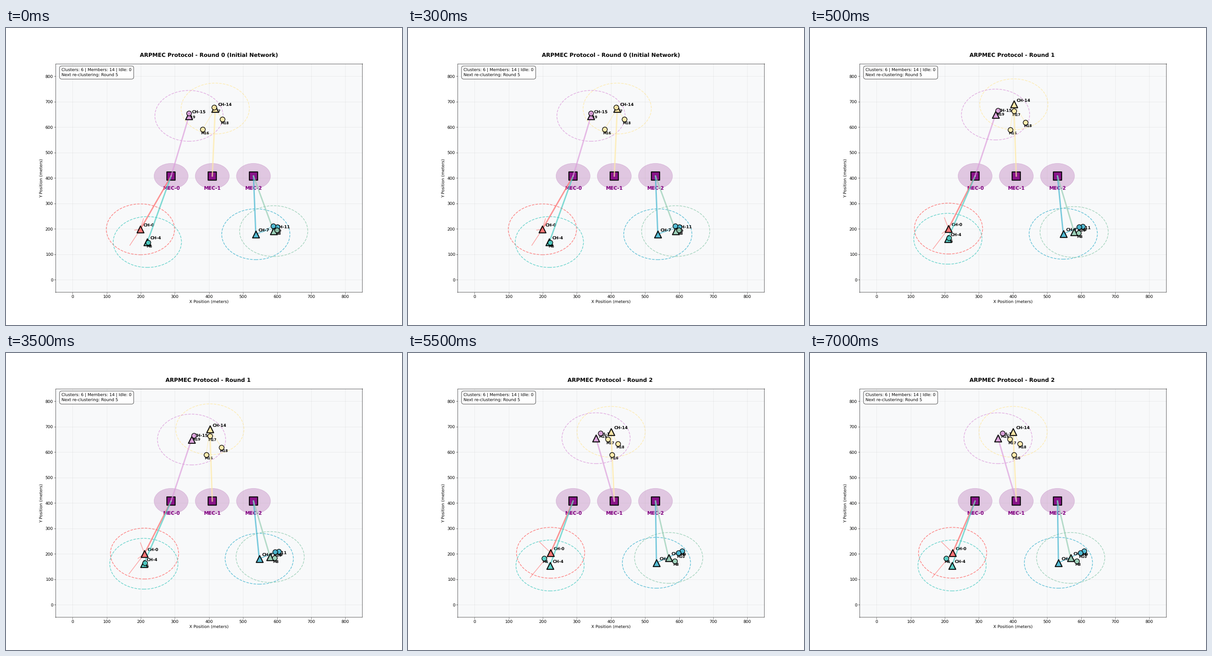
A matplotlib script that plays this animation: 864 by 648 pixels, repeating every 8000 ms.

```python
import math

import matplotlib.pyplot as plt
from matplotlib.animation import FuncAnimation
from matplotlib.patches import Circle

plt.rcParams.update({"font.family": "DejaVu Sans", "font.size": 12,
                     "text.hinting": "no_hinting"})

STEP = 500                  # ms per animation frame
FRAMES = 16
ROUND_STARTS = (500, 5500)  # ms at which rounds 1 and 2 begin
SWAY = 15                   # metres

MECS = [(289 + 120.8 * i, 407.6) for i in range(3)]


class Node:
    """Drifts steadily each round; some also sway along a heading."""

    def __init__(self, num, start, drift, heading=None):
        self.num, self.start, self.drift = num, start, drift
        self.heading = heading

    def at(self, rnd):
        x, y = (s + d * rnd for s, d in zip(self.start, self.drift))
        if self.heading is not None:
            swing = SWAY * math.sin(rnd * math.pi / 2)
            x += swing * math.cos(math.radians(self.heading))
            y += swing * math.sin(math.radians(self.heading))
        return x, y


# colour, head, members shown as nodes, members shown as links only
CLUSTERS = [
    ("#FF6B6B", Node(0, (199, 198), (12, 3)), [],
     [Node(1, (168, 135), (-2.4, -14)), Node(2, (182, 195), (10, -13.5)),
      Node(3, (208, 240), (-9, 3.6))]),
    ("#4ECDC4", Node(4, (219.4, 148), (1, 3), 139),
     [Node(6, (221, 145.7), (-8.5, 18.2))], []),
    ("#45B7D1", Node(7, (537.4, 178.6), (-2, -7), 36),
     [Node(9, (601, 207), (4, 2.4)), Node(10, (589, 211), (4.5, -3.8))], []),
    ("#96CEB4", Node(11, (589.8, 191), (-10.3, -3.6)),
     [Node(8, (598.8, 195.7), (-6, -12))], []),
    ("#FFEAA7", Node(14, (418.4, 673.3), (-9, 3.4), 117),
     [Node(16, (381, 591), (11, -0.5)), Node(17, (415.5, 678), (-12.3, -13.5)),
      Node(18, (439, 631), (-9.4, 1), -62)], []),
    ("#DDA0DD", Node(15, (341.5, 644.5), (7.4, 5.2)),
     [Node(19, (341.5, 654), (14.2, 10.7))], []),
]

fig, ax = plt.subplots(figsize=(16, 12), dpi=54)


def link(a, b, color, **kw):
    ax.plot(*zip(a, b), color=color, **kw)


def tag(text, pos, offset, size, **kw):
    ax.annotate(text, pos, xytext=offset, textcoords="offset points",
                fontsize=size, fontweight="bold", **kw)


def mark(pos, color, marker, size, width, zorder):
    ax.scatter(*pos, c=color, marker=marker, s=size, edgecolors="black",
               linewidths=width, alpha=0.9, zorder=zorder)


def draw_mecs():
    for i, pos in enumerate(MECS):
        ax.add_patch(Circle(pos, 50, color="purple", alpha=0.2))
        mark(pos, "purple", "s", 600, 3, 3.5)
        tag(f"MEC-{i}", pos, (0, -40), 14, color="purple", ha="center")


def draw_cluster(rnd, color, head, shown, linked):
    center = head.at(rnd)
    nearest = min(MECS, key=lambda mec: math.dist(mec, center))
    ax.add_patch(Circle(center, 100, fill=False, ec=color, ls="--",
                        lw=2, alpha=0.8))
    link(center, nearest, color, lw=4, alpha=0.7, zorder=4)
    mark(center, color, "^", 400, 3, 5)
    tag(f"CH-{head.num}", center, (8, 8), 12)
    for node in shown + linked:
        link(center, node.at(rnd), color, lw=2, alpha=0.6, zorder=2)
    for node in shown:
        mark(node.at(rnd), color, "o", 200, 2, 6)
        tag(f"M{node.num}", node.at(rnd), (-5, -15), 10)


def draw_frame(rnd):
    ax.set_facecolor("#f8f9fa")
    ax.set(xlim=(-50, 850), ylim=(-50, 850),
           xlabel="X Position (meters)", ylabel="Y Position (meters)")
    ax.grid(True, alpha=0.3)
    for side in ("right", "bottom"):
        ax.spines[side].set_snap(False)
    note = "" if rnd else "(Initial Network)"
    ax.set_title(f"ARPMEC Protocol - Round {rnd} {note}",
                 fontsize=16, fontweight="bold", pad=20)
    ax.text(0.02, 0.98,
            "Clusters: 6 | Members: 14 | Idle: 0\nNext re-clustering: Round 5",
            transform=ax.transAxes, va="top",
            bbox=dict(boxstyle="round,pad=0.5", fc="white", alpha=0.9))


def update(i):
    rnd = sum(i * STEP >= start for start in ROUND_STARTS)
    ax.clear()
    draw_frame(rnd)
    draw_mecs()
    for cluster in CLUSTERS:
        draw_cluster(rnd, *cluster)


anim = FuncAnimation(fig, update, frames=FRAMES, interval=STEP,
                     init_func=lambda: update(0), repeat=True, repeat_delay=0)
plt.show()
```
